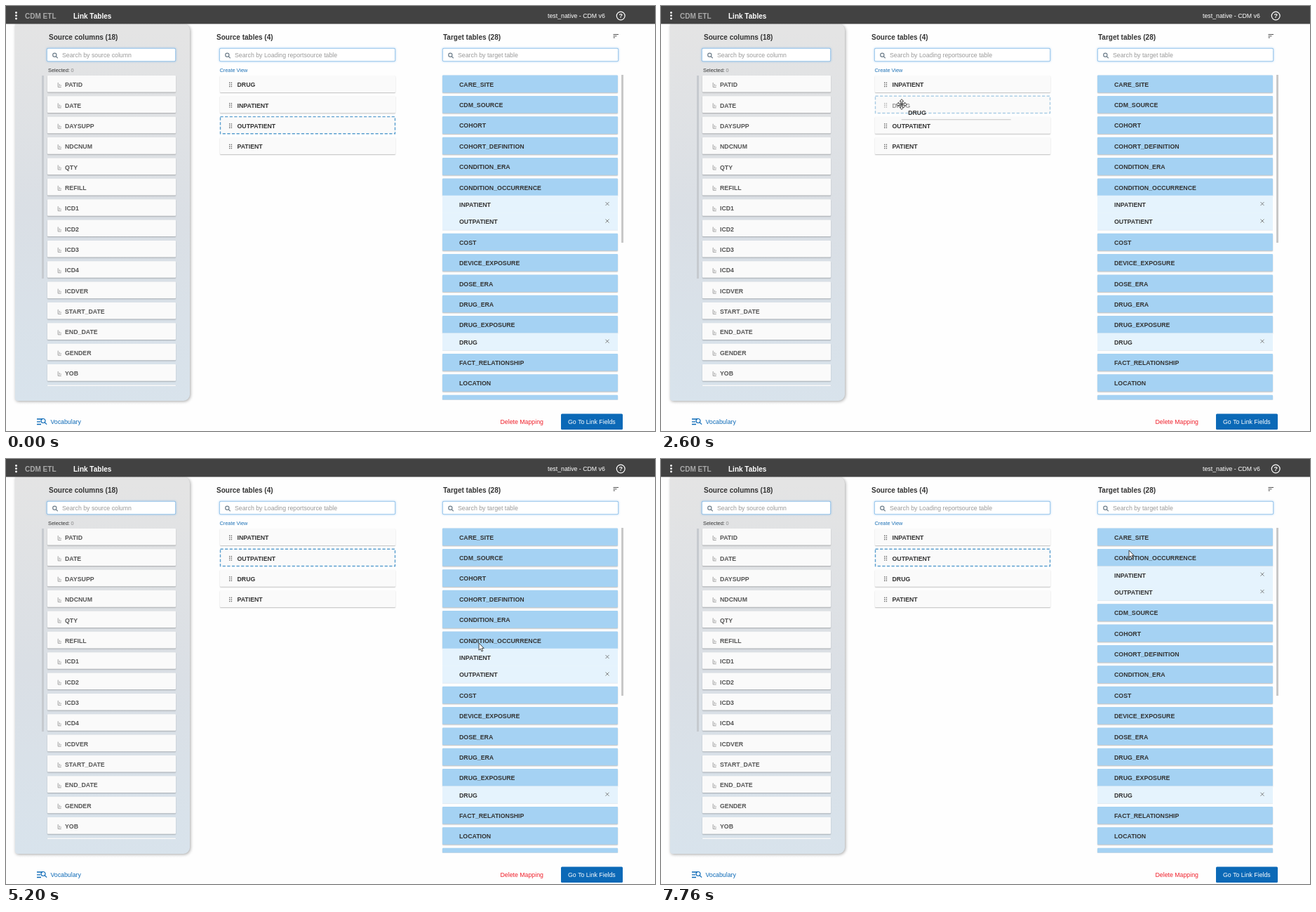
These frames come from a looping animation (925x605 px, 8000 ms). An HTML page with a canvas:

```html
<!DOCTYPE html>
<html lang="en">
<head>
<meta charset="utf-8">
<title>Link Tables</title>
<style>
  html, body { margin: 0; width: 100%; height: 100%; overflow: hidden; background: #fefefe; }
  canvas { display: block; }
</style>
</head>
<body>
<canvas id="stage" width="925" height="605"></canvas>
<script>
const ctx = document.getElementById('stage').getContext('2d');
const LOOP = 8000, PITCH = 29.36, SUB_PITCH = 24.45, TOP = 98.6;
const DRAGGED = 'CONDITION_OCCURRENCE';

const columns = ('PATID DATE DAYSUPP NDCNUM QTY REFILL ICD1 ICD2 ICD3 ICD4 ICDVER ' +
  'START_DATE END_DATE GENDER YOB RACE').split(' ');
const upper = 'CARE_SITE CDM_SOURCE COHORT COHORT_DEFINITION CONDITION_ERA'.split(' ');
const linked = ['INPATIENT', 'OUTPATIENT'];
const lower = 'COST DEVICE_EXPOSURE DOSE_ERA DRUG_ERA DRUG_EXPOSURE DRUG FACT_RELATIONSHIP LOCATION MEASUREMENT'.split(' ');

// Pointer path: time, x, y
const path = [
  [290, 800, 598], [470, 690, 470], [650, 540, 300], [830, 410, 195], [1070, 346, 149],
  [1270, 344, 142], [1500, 344, 138], [1880, 343, 110], [2000, 343, 112], [2420, 343, 140],
  [2840, 343, 140], [3290, 347, 168], [3480, 347, 168], [4030, 348, 135], [4400, 348, 135],
  [4620, 480, 220], [4840, 640, 310], [4960, 675, 317], [5200, 674, 262], [5740, 671, 257],
  [6050, 671, 257], [6110, 671, 251], [6170, 670, 238.5], [6230, 668, 224], [6610, 667, 148.5],
  [6670, 667, 143.5], [6850, 667, 134], [7150, 667, 130]
];

// Label, left edge, centre, show time, hide time
const tooltips = [
  ['inpatient', 553, 142, 1155, 1420],
  ['drug', 553, 112, 1780, 1990],
  ['outpatient', 553, 171, 3100, 3430],
  ['condition_occurrence', 871, 258.5, 5260, 6140]
];

// Drag start, release, settled, destination slot
const drags = [
  { item: 'DRUG', press: 1940, start: 2000, drop: 2600, end: 2840, x: 305, y: 141 },
  { item: 'OUTPATIENT', press: 3420, start: 3480, drop: 4400, end: 4640, x: 305, y: 141 },
  { item: DRAGGED, press: 5720, start: 6050, drop: 7520, end: 7750, x: 622, y: 141 }
];

const clamp = (v, lo, hi) => Math.min(hi, Math.max(lo, v));
const mix = (a, b, p) => a + (b - a) * p;
const within = (t, a, b) => t >= a && t < b;

function pointerAt(t) {
  const i = path.findIndex(p => p[0] > t);
  if (i === 0) return path[0].slice(1);
  if (i < 0) return path[path.length - 1].slice(1);
  const [a, b] = [path[i - 1], path[i]];
  const p = (t - a[0]) / (b[0] - a[0]);
  return [mix(a[1], b[1], p), mix(a[2], b[2], p)];
}

function rect(x, y, w, h, color, radius = 0) {
  ctx.fillStyle = color;
  ctx.beginPath();
  ctx.roundRect(x, y, w, h, radius);
  ctx.fill();
}

function dot(x, y, r, color) {
  ctx.fillStyle = color;
  ctx.beginPath();
  ctx.arc(x, y, r, 0, 7);
  ctx.fill();
}

function stroke(d, color, width = 1) {
  ctx.strokeStyle = color;
  ctx.lineWidth = width;
  ctx.stroke(new Path2D(d));
}

function text(s, x, centre, color, bold = false, size = 8.78) {
  ctx.font = `${bold ? 'bold ' : ''}${size}px "Liberation Sans", Arial, sans-serif`;
  ctx.fillStyle = color;
  ctx.fillText(s, x, centre + size * 0.36);
}

function shadowed(blur, dx, dy, color, draw) {
  ctx.save();
  Object.assign(ctx, { shadowBlur: blur, shadowOffsetX: dx, shadowOffsetY: dy, shadowColor: color });
  draw();
  ctx.restore();
}

function clipped(x, y, w, h, draw) {
  ctx.save();
  ctx.beginPath();
  ctx.rect(x, y, w, h);
  ctx.clip();
  draw();
  ctx.restore();
}

function card(x, y, w, h, color) {
  shadowed(1.5, 0, 1, 'rgba(0,0,0,.25)', () => rect(x, y, w, h, color, 1));
}

function magnifier(x, y, r, color) {
  stroke(`M${x - r} ${y}a${r} ${r} 0 1 0 ${2 * r} 0a${r} ${r} 0 1 0 ${-2 * r} 0M${x + r * .7} ${y + r * .7}l${r} ${r}`, color, 1.2);
}

function searchBox(x, w, hint) {
  shadowed(3, 0, 0, 'rgba(60,150,230,.6)', () => rect(x, 60, w, 19, '#8fc0e8', 2));
  rect(x + .8, 60.8, w - 1.6, 17.4, '#fff', 1.5);
  magnifier(x + 11.3, 69.8, 2.6, '#6f7f8c');
  text(hint, x + 22, 70, '#999');
}

function drawHeader() {
  rect(0, 0, 925, 25.5, '#424242');
  for (const y of [9.5, 13.7, 18]) dot(14.5, y, 1.4, '#fff');
  text('CDM ETL', 27, 14, '#a9a9a9', true, 10.03);
  text('Link Tables', 96, 14, '#fff', true, 10.03);
  text('test_native - CDM v6', 772, 13.5, '#fff');
  stroke('M870.3 14a5.9 5.9 0 1 0 11.8 0a5.9 5.9 0 1 0 -11.8 0', '#fff', 1.2);
  text('?', 873.5, 14, '#fff', true, 9);
}

function drawSources() {
  const shade = ctx.createLinearGradient(60, 26, 20, 562);
  shade.addColorStop(0, '#e4e4e4');
  shade.addColorStop(.5, '#dadfe5');
  shade.addColorStop(1, '#d8e3ec');
  shadowed(4, 1, 1, 'rgba(0,0,0,.35)', () => rect(13, 25.5, 249, 536.5, shade, [0, 9, 9, 4]));
  text('Source columns (18)', 61, 44, '#333', true, 10);
  searchBox(58, 184, 'Search by source column');
  text('Selected:', 60, 91, '#333', false, 7.4);
  text('0', 92.5, 91, '#888', false, 7.4);
  rect(51, 99, 3, 289, '#c6cacf');
  clipped(56, 97, 190, 444, () => columns.forEach((name, i) => {
    const y = 99 + i * PITCH;
    card(59, y, 183, 23.6, '#fafafa');
    stroke(`M74.2 ${y + 10}v6.5h4.5M76.3 ${y + 12}v3M78.2 ${y + 13.5}v1.5`, '#999', .9);
    text(name, 84, y + 13, '#555', true);
  }));
}

function drawTables(t) {
  text('Source tables (4)', 300, 44, '#333', true, 10);
  searchBox(304, 251, 'Search by Loading reportsource table');
  text('Create View', 304.5, 91, '#1a6fb5', false, 7.35);
  const order = t < 2220 ? ['DRUG', 'INPATIENT', 'OUTPATIENT', 'PATIENT']
    : t < 3700 ? ['INPATIENT', 'DRUG', 'OUTPATIENT', 'PATIENT']
    : ['INPATIENT', 'OUTPATIENT', 'DRUG', 'PATIENT'];
  const selected = within(t, 1940, 3420) ? 'DRUG' : 'OUTPATIENT';
  order.forEach((name, i) => {
    const y = TOP + .4 + i * PITCH;
    const faded = drags.some(d => d.item === name && within(t, d.start, d.end));
    if (name === selected) rect(305, y, 250, 24.5, '#fafafa');
    else card(305, y, 250, 24, '#fafafa');
    ctx.globalAlpha = faded ? .5 : 1;
    if (name === selected) {
      ctx.setLineDash([4.2, 2.4]);
      stroke(`M305.5 ${y - .1}h249v24.2h-249z`, '#5b9fcf', 1.4);
      ctx.setLineDash([]);
    }
    for (const dx of [0, 2.7])
      for (const dy of [-2.6, 0, 2.6]) rect(318 + dx, y + 12.2 + dy, 1.4, 1.4, '#666');
    text(name, 329.5, y + 13.1, '#333', true);
    ctx.globalAlpha = 1;
  });
}

function drawTargets(t) {
  text('Target tables (28)', 623, 44, '#333', true, 10);
  stroke('M865.5 40.5h7.5M865.5 42.8h5M865.5 45h2.5', '#555', 1);
  searchBox(622, 251, 'Search by target table');
  rect(877, 98, 3, 239, '#c8c8c8');

  const { start, end } = drags[2], dragging = within(t, start, end);
  const slot = t < start ? 5 : clamp(Math.round((pointerAt(t)[1] - 111) / PITCH), 1, 5);
  const head = upper.slice(0, slot), rest = upper.slice(slot);
  const names = dragging
    ? [...head, DRAGGED, ...rest, ...linked, ...lower]
    : [...head, DRAGGED, ...linked, ...rest, ...lower];
  const isLight = i => names[i - 1] === DRAGGED || names[i] === 'OUTPATIENT' || names[i] === 'DRUG';

  let y = TOP;
  clipped(618, 96, 258, 464.5, () => names.forEach((name, i) => {
    const light = isLight(i);
    ctx.globalAlpha = dragging && name === DRAGGED ? .5 : 1;
    if (light) rect(622, y, 250, 24.6, '#e5f3fd');
    else card(622, y, 250, 24.6, '#a5d2f3');
    if (light && !isLight(i + 1)) rect(622, y + 24.4, 250, .8, '#dbe6ee');
    text(name, 646, y + 13, '#333', true);
    if (name === 'DRUG' || linked.includes(name))
      stroke(`M854.5 ${y + 9.2}l5 5m0 -5l-5 5`, '#777', .9);
    ctx.globalAlpha = 1;
    y += isLight(i + 1) ? SUB_PITCH : PITCH;
  }));
}

function drawFooter() {
  stroke('M44 588h8M44 591.8h5M44 595.5h6', '#0b69b7', 1.3);
  magnifier(53, 590.5, 3, '#0b69b7');
  text('Vocabulary', 63.5, 592, '#0b69b7');
  text('Delete Mapping', 704.5, 592, '#f0202b');
  rect(791, 580.5, 88, 22.5, '#0b69b7', 1.5);
  text('Go To Link Fields', 801, 592, '#fff');
}

function drawTooltips(t) {
  for (const [label, x, y, show, hide] of tooltips) {
    const alpha = clamp((t - show) / 150, 0, 1) * clamp(1 - (t - hide) / 150, 0, 1);
    if (!alpha) continue;
    ctx.globalAlpha = alpha;
    ctx.font = '8.78px "Liberation Sans", Arial, sans-serif';
    rect(x, y - 10, ctx.measureText(label).width + 10, 20, 'rgba(97,97,97,.9)', 2.5);
    text(label, x + 5, y, '#fff');
    ctx.globalAlpha = 1;
  }
}

function drawPreview(t, d) {
  let [x, y] = pointerAt(Math.max(t - 60, d.start));
  y += 12;
  const p = clamp((t - d.drop) / (d.end - d.drop), 0, 1);
  const eased = 1 - (1 - p) ** 2;
  x = mix(x, d.x, eased);
  y = mix(y, d.y, eased);
  rect(x, y + 9.3, 156, 1.1, '#c4c4c4');
  text(d.item, x + 9.5, y, '#333', true);
}

function drawPointer(t) {
  if (t < 290) return;
  const [x, y] = pointerAt(t);
  if (drags.some(d => within(t, d.press, d.drop))) dot(x, y, 7.5, 'rgba(250,235,30,.85)');
  ctx.save();
  ctx.translate(x, y);
  ctx.strokeStyle = '#333';
  ctx.fillStyle = '#fff';
  ctx.lineWidth = .9;
  if (within(t, 1130, 4000) || within(t, 5240, 7640)) {
    if (drags.some(d => within(t, d.press, d.drop))) ctx.fillStyle = '#f7ee70';
    for (let i = 0; i < 4; i++) {
      const arm = new Path2D('M-1 -1V-4.3H-2.8L0 -7.4L2.8 -4.3H1V-1z');
      ctx.fill(arm);
      ctx.stroke(arm);
      ctx.rotate(Math.PI / 2);
    }
  } else {
    const arrow = new Path2D('M0 0V10.2L2.3 8.1L4 12L5.7 11.2L4.1 7.4H7.2z');
    ctx.fill(arrow);
    ctx.stroke(arrow);
  }
  ctx.restore();
}

function frame(now) {
  const t = now % LOOP;
  rect(0, 0, 925, 605, '#fefefe');
  drawSources();
  drawHeader();
  drawTables(t);
  drawTargets(t);
  drawFooter();
  drawTooltips(t);
  drags.filter(d => within(t, d.start, d.end)).forEach(d => drawPreview(t, d));
  drawPointer(t);
  requestAnimationFrame(frame);
}
requestAnimationFrame(frame);
</script>
</body>
</html>
```
